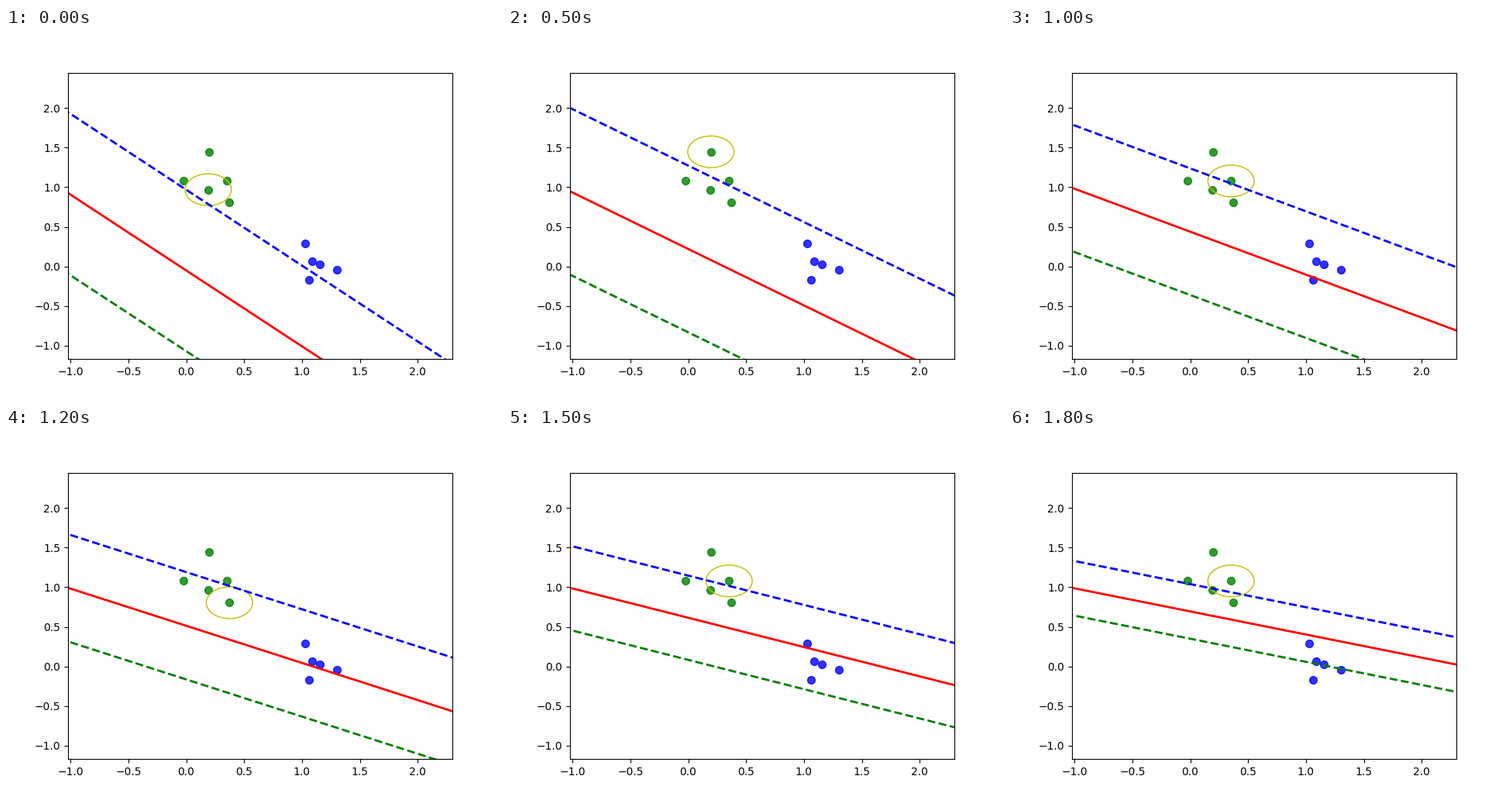
Recreate the animation shown at these times as a matplotlib script. Size 640 by 480 pixels, loop 1.9 s.

```python
import numpy as np
import matplotlib.pyplot as plt
from matplotlib.animation import FuncAnimation

FRAMES = 19
INTERVAL = 100

# Two small clusters of training points
rng = np.random.RandomState(0)
upper = 0.2 * rng.randn(5, 2) + [0, 1]
lower = 0.2 * rng.randn(5, 2) + [1, 0]
points = np.vstack([upper, lower])

# Key points of the training run
STEPS = [0, 5, 8, 10, 13, 16, 18]
SLOPES = [-0.959, -0.714, -0.611, -0.543, -0.433, -0.339, -0.292]
MARGINS = [1.02, 1.053, 0.761, 0.8, 0.617, 0.49, 0.345]
PICKS = [3, 1, 3, 0, 3, 2, 0]

fig, ax = plt.subplots(figsize=(6.4, 4.8), dpi=100)
(xmin, ymin), (xmax, ymax) = points.min(axis=0) - 1, points.max(axis=0) + 1

ax.scatter(*upper.T, s=50, color="green", alpha=0.8)
ax.scatter(*lower.T, s=50, color="blue", alpha=0.8)
ring = ax.add_patch(plt.Circle((0, 0), 0.2, color="y", fill=False))

# Lines run past the canvas so that dashes start at its edge
span = np.array([-10.0, 10.0])
styles = [("red", "-", 0), ("blue", "--", 1), ("green", "--", -1)]
lines = [(ax.plot([], [], color=color, ls=ls, lw=2)[0], side)
         for color, ls, side in styles]

ax.set_xlim(xmin, xmax)
ax.set_ylim(ymin, ymax)


def picked(step):
    """Start at the last key pick and walk through the upper cluster."""
    key = np.searchsorted(STEPS, step, side="right") - 1
    return upper[(PICKS[key] + step - STEPS[key]) % len(upper)]


def update(step):
    slope = np.interp(step, STEPS, SLOPES)
    margin = np.interp(step, STEPS, MARGINS)
    # The boundary turns about its left end, which rises a little at first
    pivot = 0.928 + 0.065 * min(step / 10, 1) ** 1.6
    for line, side in lines:
        line.set_data(span, pivot + slope * (span - xmin) + side * margin)
    ring.center = tuple(picked(step))
    return [ring] + [line for line, _ in lines]


anim = FuncAnimation(fig, update, frames=FRAMES, interval=INTERVAL,
                     repeat=True, repeat_delay=0)
plt.show()
```
